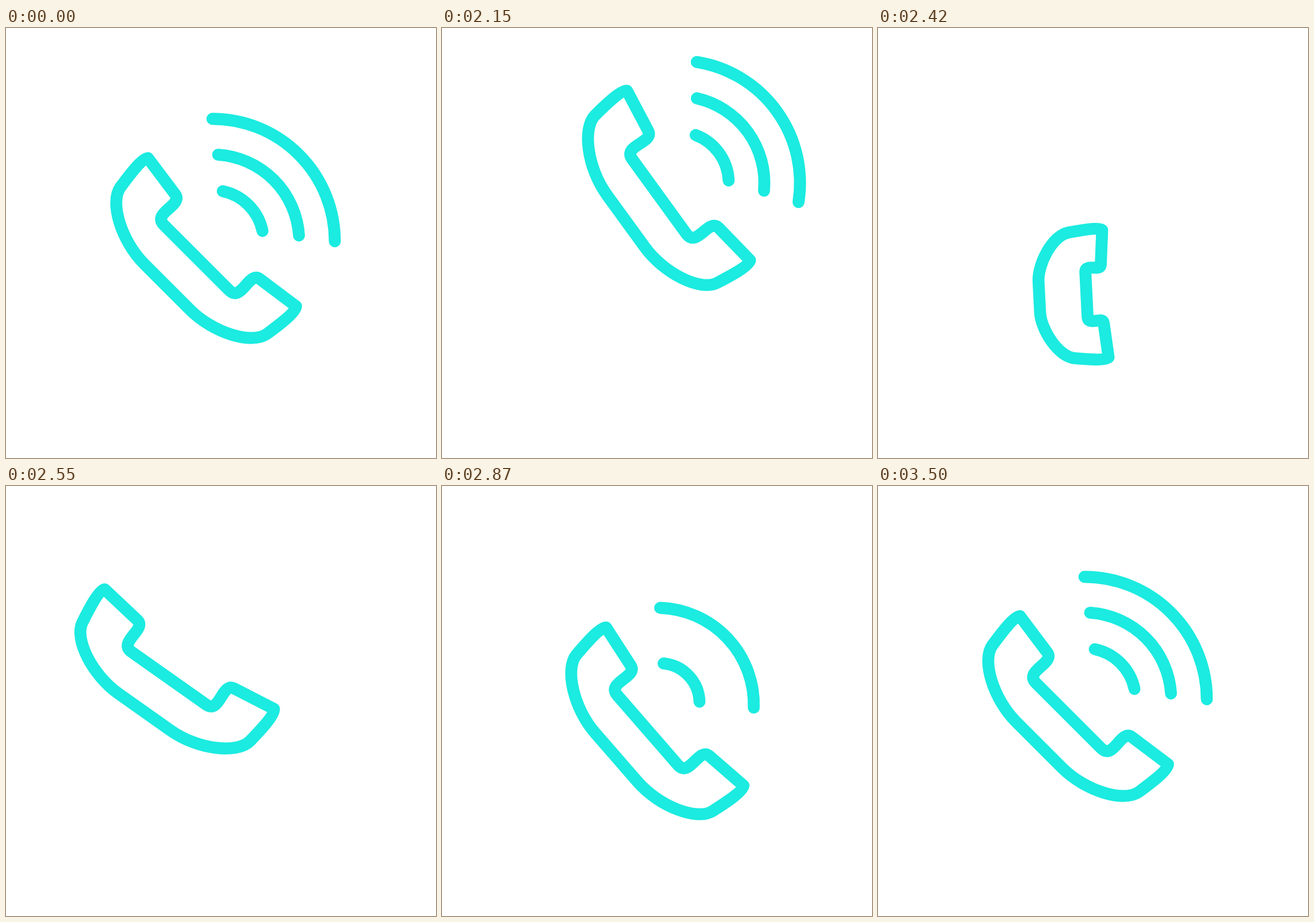
Animation of 748x748 px, one loop 3.52 s. Source, as an HTML page with a canvas:

```html
<!DOCTYPE html>
<html lang="en">
<head>
<meta charset="utf-8">
<title>Ringing phone</title>
<style>
  html, body { margin: 0; width: 100%; height: 100%; overflow: hidden; background: #fff; }
  canvas { display: block; width: 748px; height: 748px; }
</style>
</head>
<body>
<canvas width="748" height="748"></canvas>
<script>
const ctx = document.querySelector('canvas').getContext('2d');
const LOOP = 3520, RAD = Math.PI / 180;
const MID = { x: 376.5, y: 354.5 }, HUB = { x: 359, y: 371 };
const clamp = v => Math.max(0, Math.min(1, v));
const mix = (a, b, u) => a + (b - a) * u;
const ease = (t, from, to) => {
  const u = clamp((t - from) / (to - from));
  return u * u * (3 - 2 * u);
};

// Eases from one [time, value] key to the next
const tween = (t, ...keys) => keys.reduce((value, [time, next], i) =>
  i ? mix(value, next, ease(t, keys[i - 1][0], time)) : next, 0);

// One half of the handset: outer curve, earpiece edge, inner notch
const outer = [[241, 411], [200, 370], [180, 303], [199, 277], [213, 258], [236, 227], [247, 226.5]];
const inner = [[294, 289], [309, 309], [253, 321], [275, 343]];

// Stage point to handset axes; a folded handset is short with a flat inner edge
function place([x, y], depth, open) {
  const u = (x + y - MID.x - MID.y) * Math.SQRT1_2;
  const v = (y - x + MID.x - MID.y) * Math.SQRT1_2;
  return [mix(Math.min(0, .57 * (u + 103)), u, open), mix(depth * v, v, open)];
}

function curves(points) {
  ctx.lineTo(...points[0]);
  for (let i = 1; i < points.length; i += 3)
    ctx.bezierCurveTo(...points[i], ...points[i + 1], ...points[i + 2]);
}

function handset(x, y, angle, open = 1, scale = 1) {
  const half = [[outer, .72], [inner, .1]].map(([part, depth]) =>
    part.map(p => place(p, depth, open).map(v => v * scale)));
  const mirror = part => part.map(([u, v]) => [-u, v]).reverse();
  ctx.save();
  ctx.translate(x, y);
  ctx.rotate((45 + angle) * RAD);
  ctx.beginPath();
  [...half, mirror(half[1]), mirror(half[0])].forEach(curves);
  ctx.closePath();
  ctx.stroke();
  ctx.restore();
}

function waves(x, y, angle, growth) {
  [213, 151, 89].forEach((radius, i) => {
    const g = growth(i);
    if (g <= 0) return;
    const inset = Math.asin((i ? 2 + 8 * i : 0) / radius) / RAD;
    ctx.beginPath();
    ctx.arc(x + 14 * (1 - g), y - 8 * (1 - g), radius * g,
      (angle - 90 + inset) * RAD, (angle - inset) * RAD);
    ctx.stroke();
  });
}

function flyOff(t) {
  const moving = t >= 2020;
  const e = moving ? ease(t, 1990, 2190) : 0;
  const rise = moving ? 478 * ((t - 2000) / 300) ** 2.3 : 0;
  const x = MID.x + 59 * e, y = MID.y - rise, angle = 10 * e;
  const dx = HUB.x - MID.x, dy = HUB.y - MID.y;
  const cos = Math.cos(angle * RAD), sin = Math.sin(angle * RAD);
  handset(x, y, angle);
  waves(x + dx * cos - dy * sin, y + dx * sin + dy * cos, angle, () => 1);
}

function comeBack(t) {
  handset(
    tween(t, [2280, 460], [2590, 313], [2880, 406], [3480, MID.x]),
    tween(t, [2280, 610], [2590, 268], [2860, 383], [3320, MID.y]),
    tween(t, [2280, 91], [2570, -11], [2640, -11], [3000, 10.2], [3480, 0]),
    ease(t, 2280, 2570),
    ease(t, 2230, 2300)
  );
  waves(
    tween(t, [2560, 351], [2950, 373.5], [3480, HUB.x]),
    tween(t, [2560, 380], [2850, 382], [3480, HUB.y]),
    tween(t, [2560, -2], [2980, 2.6], [3480, 0]),
    i => 1 - (1 - clamp((t - 2588 - 150 * i) / 600)) ** 2.45
  );
}

function draw(t) {
  ctx.clearRect(0, 0, 748, 748);
  ctx.strokeStyle = '#1bebe0';
  ctx.lineWidth = 20.8;
  ctx.lineCap = ctx.lineJoin = 'round';
  if (t < 2400) flyOff(t);
  if (t > 2230) comeBack(t);
}

const start = performance.now();
function tick() {
  draw((performance.now() - start) % LOOP);
  requestAnimationFrame(tick);
}
tick();
</script>
</body>
</html>
```
